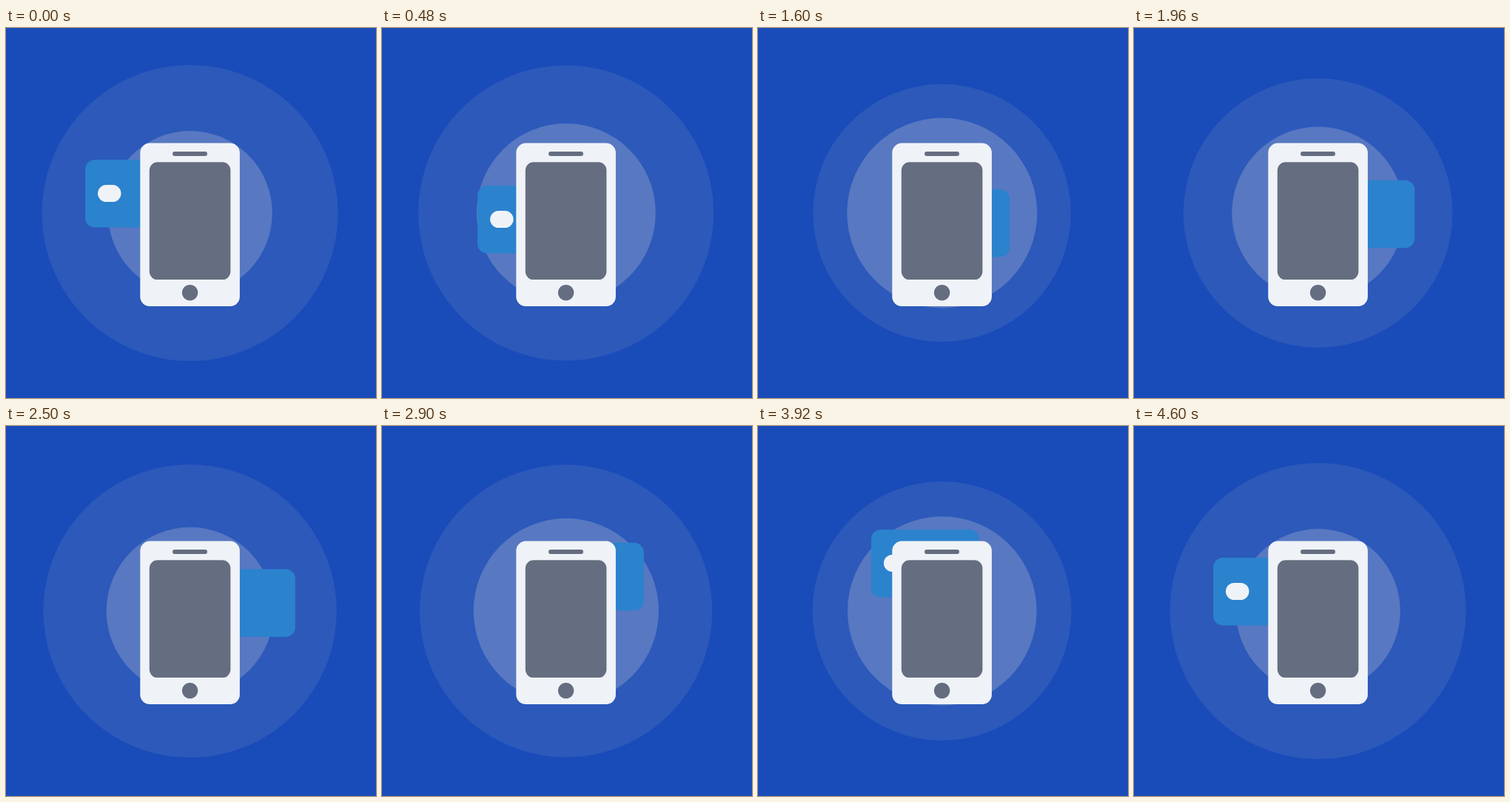
Animation of 500x500 px, one loop 4620 ms. Source, as an HTML page:

```html
<!DOCTYPE html>
<html lang="en">
<head>
<meta charset="utf-8">
<title>Card and phone</title>
<style>
  html, body { margin: 0; height: 100%; overflow: hidden; background: #194bb9; }
  svg { display: block; width: 100%; height: 100%; }
</style>
</head>
<body>
<svg viewBox="0 0 500 500">
  <circle id="outer" cx="248.6" cy="250" r="200" fill="#2c59ba"/>
  <circle id="inner" cx="248.8" cy="250" r="111" fill="#5878c2"/>
  <g id="card">
    <rect width="146" height="91.5" rx="13" fill="#2b82cd"/>
    <rect x="17" y="34" width="31.5" height="23" rx="11.5" fill="#eff3f7"/>
  </g>
  <rect x="181.3" y="155.6" width="134.6" height="220.4" rx="13" fill="#eff3f7"/>
  <g fill="#656e80">
    <rect x="193.8" y="181.2" width="109.6" height="158.9" rx="11"/>
    <rect x="225" y="167" width="47" height="6" rx="3"/>
    <circle cx="248.6" cy="357.6" r="10.7"/>
  </g>
</svg>
<script>
const LOOP = 4620, END = 4600, BEAT = END / 4;
const [outer, inner, card] = ['outer', 'inner', 'card'].map(id => document.getElementById(id));

// Hermite ease from 0 to 1 with chosen start and end slopes.
const ease = (x, start = 0, end = 0) =>
  x * x * (3 - 2 * x) + start * x * (1 - x) ** 2 - end * x * x * (1 - x);

// Eased value through [time, value] keys.
function track(keys, t) {
  const i = Math.max(1, keys.findIndex(k => k[0] >= t));
  const [t0, v0] = keys[i - 1], [t1, v1] = keys[i];
  return v0 + (v1 - v0) * ease((t - t0) / (t1 - t0));
}

const outerKeys = [[0, 200], [390, 200], [1540, 174], [2690, 200], [3830, 174], [END, 200]];
const innerKeys = [111, 137.5, 111, 137.5, 111].map((r, i) => [i * BEAT, r]);

// Card path: corner points alternating with quadratic control points.
const path = [
  [107, 178], [120.4, 221.8], [164, 227], [208.5, 213.9], [251.5, 200],
  [210.9, 159], [169, 123.8], [139.2, 155.2], [107, 178]
];

function cardAt(t) {
  const i = Math.min(3, Math.floor(t / BEAT));
  const u = ease(t / BEAT - i, i === 0 ? 1 : 0, i === 3 ? 1 : 0);
  const [a, c, b] = path.slice(2 * i, 2 * i + 3);
  return [0, 1].map(k => (1 - u) ** 2 * a[k] + 2 * u * (1 - u) * c[k] + u * u * b[k]);
}

function draw() {
  const t = Math.min(END, performance.now() % LOOP);
  outer.setAttribute('r', track(outerKeys, t));
  inner.setAttribute('r', track(innerKeys, t));
  card.setAttribute('transform', `translate(${cardAt(t)})`);
  requestAnimationFrame(draw);
}
draw();
</script>
</body>
</html>
```
